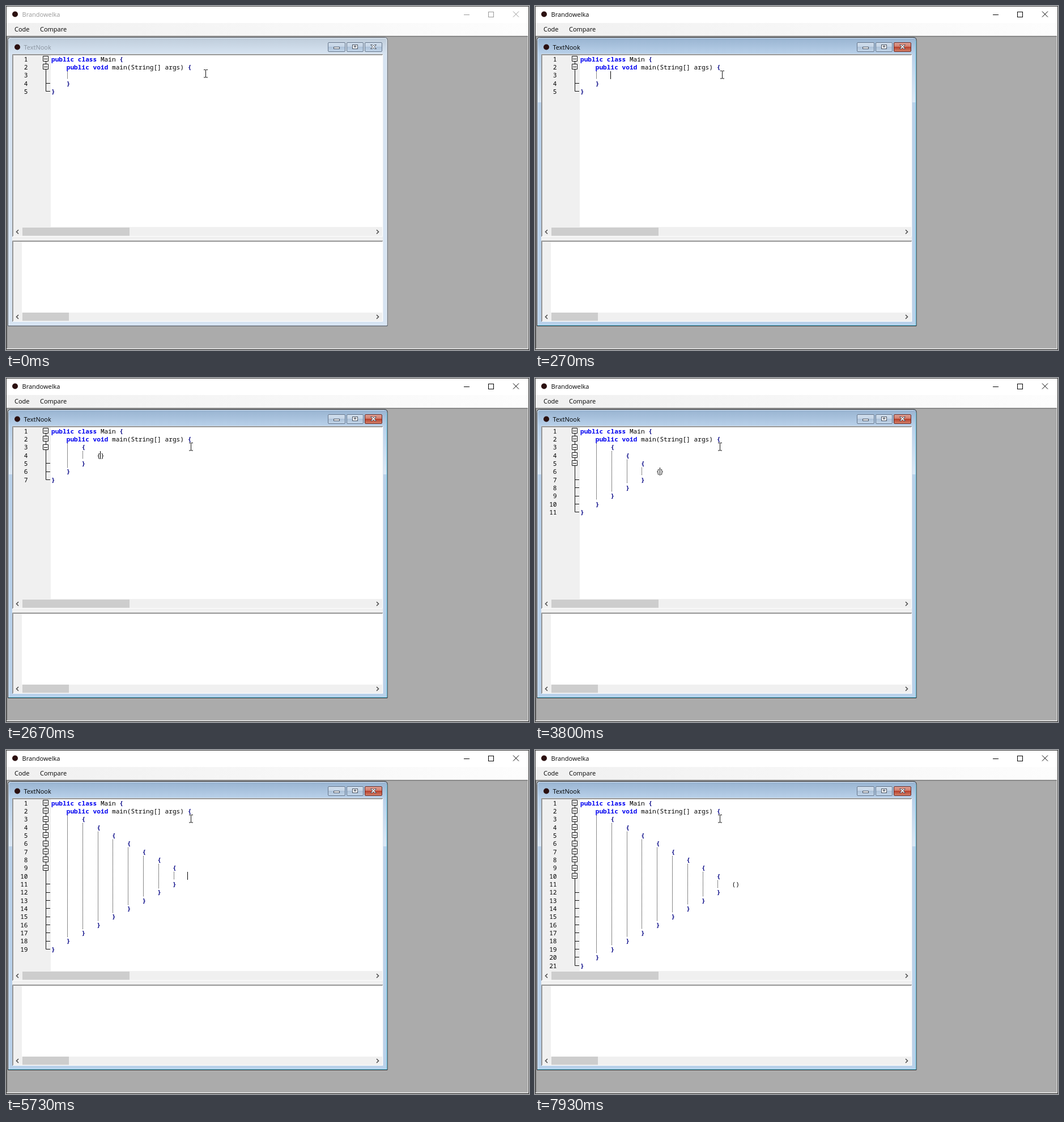
An HTML page that plays this animation: 923 by 607 pixels, repeating every 8 s.

```html
<!DOCTYPE html>
<html lang="en">
<head>
<meta charset="utf-8">
<title>Code editor</title>
<style>
  html, body { margin: 0; width: 100%; height: 100%; overflow: hidden; background: #ababab; }
  svg { display: block; width: 923px; height: 607px; }
  text { white-space: pre; }
  .ui { font: 11px "Open Sans", sans-serif; }
  .mono { font: 11.15px "Noto Sans Mono", monospace; }
  .kw { font-weight: 700; fill: #0000f0; }
  .brace { font-weight: 700; fill: #10108a; }
  .num { text-anchor: end; }
  .line { fill: none; stroke: #111; }
  .guide { stroke: #111; stroke-dasharray: 1 1; }
  .focused .idle, svg:not(.focused) .live { display: none; }
  .caption { fill: #999; }
  .controls { fill: none; stroke: #999; }
  .childCaption { fill: #8a949f; }
  .focused .caption, .focused .childCaption { fill: #000; }
  .focused .controls { stroke: #000; }
  .glyph { fill: #fff; stroke: #46505f; }
  .arrow { fill: none; stroke: #505050; stroke-width: 1.6; }
</style>
</head>
<body>
<svg id="stage" viewBox="0 0 923 607">
  <defs>
    <linearGradient id="menu"><stop stop-color="#f0f0f0"/><stop offset="1" stop-color="#fdfdfd"/></linearGradient>
    <linearGradient id="titleIdle" x2="0" y2="1"><stop stop-color="#bfcddb"/><stop offset="1" stop-color="#d7e4f2"/></linearGradient>
    <linearGradient id="titleLive" x2="0" y2="1"><stop stop-color="#99b4d1"/><stop offset="1" stop-color="#b9d1ea"/></linearGradient>
    <linearGradient id="side" x2="0" y2="1"><stop stop-color="#b9d1ea"/><stop offset="1" stop-color="#dce8f5"/></linearGradient>
    <linearGradient id="button" x2="0" y2="1">
      <stop stop-color="#d3e0ee"/><stop offset=".48" stop-color="#c3d3e5"/>
      <stop offset=".5" stop-color="#adc2d9"/><stop offset="1" stop-color="#c3d6ea"/>
    </linearGradient>
    <linearGradient id="closeButton" x2="0" y2="1">
      <stop stop-color="#e0a397"/><stop offset=".48" stop-color="#cf7767"/>
      <stop offset=".5" stop-color="#b8402c"/><stop offset="1" stop-color="#d3836c"/>
    </linearGradient>
    <path id="frame" d="M3.5 564.5V60.5q0-5 5-5H668q5 0 5 5V564.5Z"/>
    <path id="titleBar" d="M5 85V61q0-4 4-4H668q4 0 4 4V85Z"/>
  </defs>

  <!-- main window -->
  <rect width="923" height="607" fill="#ababab"/>
  <rect width="923" height="30" fill="#fff"/>
  <rect y="30" width="923" height="23" fill="url(#menu)"/>
  <path d="M1 53.5H921M1.5 53V604" stroke="#747474" stroke-width="1.6" fill="none"/>
  <path d="M1 604.5H921.5V53" stroke="#f4f4f4" fill="none"/>
  <rect x=".5" y=".5" width="922" height="606" fill="none" stroke="#3b3b3b"/>
  <circle cx="16" cy="14.5" r="5" fill="#2b1010"/>
  <text class="ui caption" x="28.5" y="19">Brandowelka</text>
  <g class="controls">
    <path d="M808 15.5H818M895 9.5l10 10M905 9.5l-10 10"/>
    <rect x="851.5" y="10.5" width="9" height="9"/>
  </g>
  <text class="ui" x="15" y="45">Code</text>
  <text class="ui" x="60" y="45">Compare</text>

  <!-- child window -->
  <g class="idle">
    <use href="#frame" fill="#d7e4f2" stroke="#4d5560"/>
    <use href="#titleBar" fill="url(#titleIdle)"/>
    <path d="M4.5 563V61q0-4.500 4.500-4.500H668q4 0 4 4.500V563" fill="none" stroke="#eef4fa"/>
  </g>
  <g class="live">
    <use href="#frame" fill="#b9d1ea" stroke="#1c2026"/>
    <use href="#titleBar" fill="url(#titleLive)"/>
    <path d="M5 85h6v85h-6zM666 85h6v85h-6z" fill="url(#side)"/>
    <path d="M4.5 563V61q0-4.500 4.500-4.500H668" fill="none" stroke="#e4eef8"/>
    <path d="M672 61V563.5H5" fill="none" stroke="#6fd3ee"/>
  </g>
  <circle cx="20" cy="72.5" r="5" fill="#2b1010"/>
  <text class="ui childCaption" x="31.5" y="77">TextNook</text>
  <g stroke="#66768b">
    <rect x="568.5" y="64.5" width="30" height="16" rx="1.5" fill="url(#button)"/>
    <rect x="601.5" y="64.5" width="29" height="16" rx="1.5" fill="url(#button)"/>
    <rect class="idle" x="633.5" y="64.5" width="30" height="16" rx="1.5" fill="url(#button)"/>
    <rect class="live" x="633.5" y="64.5" width="30" height="16" rx="1.5" fill="url(#closeButton)" stroke="#6b2a24"/>
  </g>
  <g class="glyph">
    <rect x="578.5" y="72.5" width="10" height="3"/>
    <rect x="611.5" y="68.5" width="9" height="7"/>
    <rect x="614.5" y="70.5" width="3" height="2"/>
    <path d="M643.5 68.5h3l2 2 2-2h3l-3.500 3.500 3.500 3.500h-3l-2-2-2 2h-3l3.500-3.500z"/>
  </g>

  <!-- panes -->
  <rect x="11" y="84.5" width="654.5" height="472.5" fill="#f0f0f0"/>
  <rect x="79" y="86" width="585" height="304" fill="#fff"/>
  <rect x="28" y="416" width="636" height="125" fill="#fff"/>
  <path d="M11.5 407V85.5H665M11.5 557V414.5H665" fill="none" stroke="#8c8c8c"/>
  <path d="M12.5 406V86.5H664M12.5 556V415.5H664" fill="none" stroke="#696969" stroke-opacity=".6"/>
  <path d="M12 406.5H664.5V86M12 556.5H664.5V416" fill="none" stroke="#fff"/>
  <path d="M29 391H218V405.5H29zM29 541H111V555.5H29z" fill="#cdcdcd"/>
  <path class="arrow" d="M22 395l-3.500 3.500 3.500 3.500M654 395l3.500 3.500-3.500 3.500M22 545l-3.500 3.500 3.500 3.500M654 545l3.500 3.500-3.500 3.500"/>

  <g id="code"></g>
  <rect id="caret" width="1" height="14" fill="#000"/>
  <path id="pointer" class="line"
        d="M-3 -6.500h2.500q1 0 1 1q0-1 1-1h2.500M.5 -6V6.500M-3 7h2.500q1 0 1-1q0 1 1 1h2.500"/>
</svg>
<script>
  const LOOP = 8000, LEFT = 80, CHAR = 6.69, TOP = 93.3, ROW = 14.35, BLINK = 530;
  const FOCUS = 270, PAREN = 7270, PAREN_END = 7400;
  const pairTimes = [1800, 2670, 3200, 3800, 4330, 4930, 5530, 6130];
  const enterTimes = [2200, 2870, 3470, 4000, 4600, 5200, 5730, 6400];
  const strokes = [FOCUS, ...pairTimes, ...enterTimes, PAREN, PAREN_END];
  const pointerPath = [[0, 352, 119], [70, 347, 120], [130, 341, 120], [200, 335, 121],
                       [270, 330, 121], [470, 328, 121], [530, 326, 121]];
  const pointerTimes = pointerPath.map(([at]) => at);

  const stage = document.getElementById('stage');
  const code = document.getElementById('code');
  const caret = document.getElementById('caret');
  const pointer = document.getElementById('pointer');

  const colX = col => LEFT + col * CHAR;
  const rowY = row => TOP + (row - 1) * ROW;
  const snap = v => Math.floor(v) + 0.5;
  const countPast = (times, t) => times.filter(at => at <= t).length;
  const span = (cls, s) => `<tspan class="${cls}">${s}</tspan>`;
  const put = (x, row, s, cls = '') =>
    `<text class="mono ${cls}" x="${x.toFixed(2)}" y="${(rowY(row) + 4.2).toFixed(2)}">${s}</text>`;

  function drawFolds(depth, rows) {
    const x = 70.5, boxes = depth + 2;
    let d = `M${x} ${snap(rowY(1))}V${snap(rowY(rows))}H78`;
    for (let row = boxes + 2; row < rows; row++) d += `M${x} ${snap(rowY(row))}H78`;
    let out = `<path class="line" d="${d}"/>`;
    for (let row = 1; row <= boxes; row++) {
      const y = snap(rowY(row));
      out += `<path class="line" style="fill:#fff" d="M65.5 ${y - 5}h9v9h-9z"/>
              <path class="line" d="M67 ${y}h6"/>`;
    }
    return out;
  }

  function drawCode(depth, pair) {
    const rows = 5 + 2 * depth;
    let out = drawFolds(depth, rows);
    for (let row = 1; row <= rows; row++) out += put(38.5, row, row, 'num');

    out += put(colX(0), 1, span('kw', 'public class') + ' Main ' + span('brace', '{'));
    out += put(colX(4), 2, span('kw', 'public void') + ' main(String[] args) ' + span('brace', '{'));
    for (let i = 0; i < depth; i++) out += put(colX(8 + 4 * i), 3 + i, '{', 'brace');
    for (let i = 0; i < depth + 2; i++) out += put(colX(4 * i), rows - i, '}', 'brace');
    out += put(colX(8 + 4 * depth), 3 + depth, pair);

    for (let i = 0; i <= depth; i++) {
      const x = Math.round(108.2 + 4 * CHAR * i) + 0.5;
      const y1 = Math.round(rowY(3 + i) - 7), y2 = Math.round(rowY(rows - 2 - i) + 7);
      out += `<path class="guide" d="M${x} ${y1}V${y2}"/>`;
    }
    return out;
  }

  let shown = '';
  function render(t) {
    const depth = countPast(enterTimes, t);
    const typing = countPast(pairTimes, t) > depth;
    const pair = typing ? '{}' : t >= PAREN ? '()' : '';
    const key = depth + pair;
    if (key !== shown) code.innerHTML = drawCode(depth, pair);
    shown = key;

    stage.classList.toggle('focused', t >= FOCUS);

    // The caret restarts its blink after every keystroke.
    const last = Math.max(...strokes.filter(at => at <= t));
    const on = t >= FOCUS && Math.floor((t - last) / BLINK) % 2 === 0;
    const offset = t >= PAREN_END ? 2 : pair ? 1 : 0;
    caret.setAttribute('visibility', on ? 'visible' : 'hidden');
    caret.setAttribute('x', Math.floor(colX(8 + 4 * depth + offset) - 0.3));
    caret.setAttribute('y', Math.round(rowY(3 + depth) - 7));

    const [, x, y] = pointerPath[countPast(pointerTimes, t) - 1];
    pointer.setAttribute('transform', `translate(${x} ${y})`);
  }

  function tick() {
    render(performance.now() % LOOP);
    requestAnimationFrame(tick);
  }
  tick();
</script>
</body>
</html>
```
